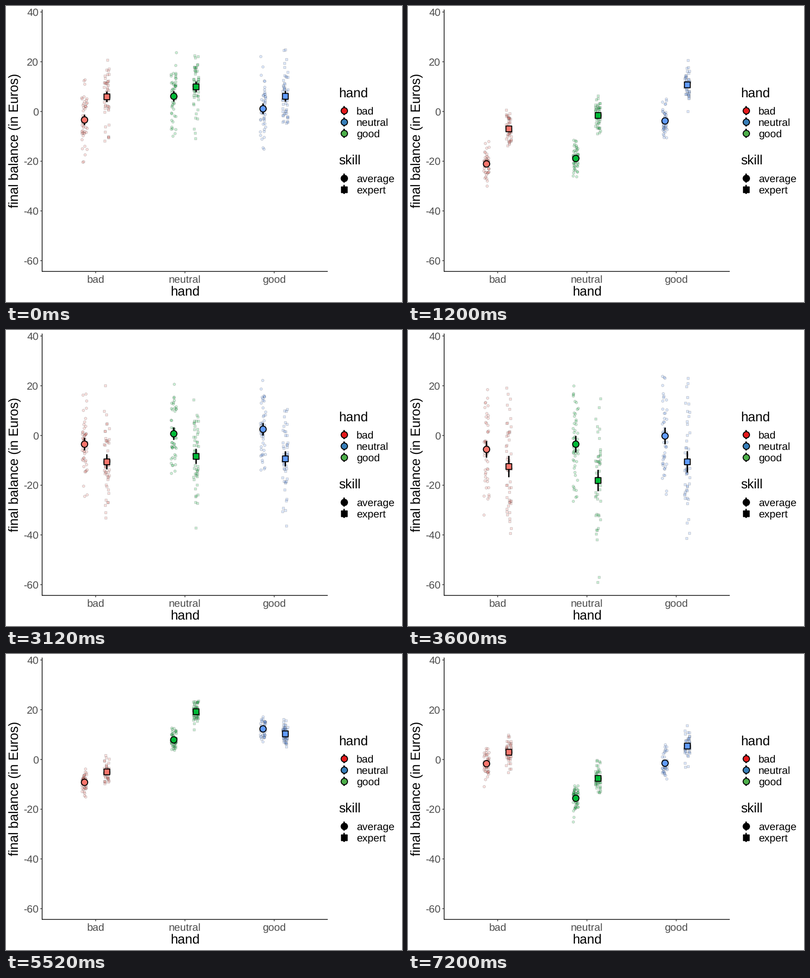
These frames come from a looping animation (800 px wide and 600 px high, 8000 ms). A matplotlib script:

```python
import numpy as np
import matplotlib.pyplot as plt
from matplotlib.animation import FuncAnimation

PT = 0.72  # points per pixel at 100 dpi
COUNT = 50
STEP = 400  # ms per frame
SCENE_FRAMES = 3
LEFT, RIGHT, TOP, BOTTOM = 73, 650, 7.3, 538
UNIT = (RIGHT - LEFT) / 3.2  # distance between categories
THIN, BAR = 1.42, 2.85

plt.rcParams.update({"font.family": "Liberation Sans", "path.snap": False,
                     "text.hinting": "none"})

HANDS = ["bad", "neutral", "good"]
HUES = ["#F8766D", "#00BA38", "#619CFF"]
KEY_HUES = ["#E41A1C", "#377EB8", "#4DAF4A"]
HAND_X = LEFT + UNIT * (0.6 + np.arange(3))

# Standard deviation for average and expert, then the mean of each group
SCENES = [
    ((7.7, 7.7), (-3.4, 5.9, 6.1, 9.9, 1.1, 6.1)),
    ((3.7, 3.7), (-21.1, -7.0, -18.9, -1.6, -3.8, 10.7)),
    ((9.0, 11.0), (-3.5, -10.6, 0.7, -8.4, 2.5, -9.4)),
    ((12.0, 15.5), (-5.6, -12.5, -3.5, -18.1, -0.2, -10.6)),
    ((2.4, 2.6), (-9.2, -5.0, 7.9, 19.2, 12.3, 10.3)),
    ((1.8, 1.9), (-5.0, -17.7, 4.5, -9.2, 4.9, -12.6)),
    ((3.2, 3.3), (-1.7, 2.9, -15.6, -7.6, -1.5, 5.4)),
]


def to_y(value):
    return 213.8 - 5.04 * value


def build_scene(rng, spreads, means):
    """Return raw points and means by skill, and the interval segments."""
    points, centres, bars = [], [], []
    for skill, spread in enumerate(spreads):
        xs = HAND_X + UNIT * (0.125 if skill else -0.125)
        mids = np.array(means[skill::2])
        noise = rng.normal(size=(3, COUNT))
        noise -= noise.mean(axis=1, keepdims=True)
        noise /= noise.std(axis=1, keepdims=True)
        ys = to_y(mids[:, None] + spread * noise)
        jitter = rng.uniform(-5.4, 5.4, (3, COUNT))
        points.append(np.column_stack([(xs[:, None] + jitter).ravel(),
                                       ys.ravel()]))
        centres.append(np.column_stack([xs, to_y(mids)]))
        half = 1.96 * spread / np.sqrt(COUNT)
        bars += [[(x, to_y(m - half)), (x, to_y(m + half))]
                 for x, m in zip(xs, mids)]
    return points, centres, bars


rng = np.random.default_rng(12)
scenes = [build_scene(rng, *scene) for scene in SCENES]

fig = plt.figure(figsize=(8, 6), dpi=100, facecolor="white")
ax = fig.add_axes([0, 0, 1, 1])
ax.set_xlim(0, 800)
ax.set_ylim(600, 0)
ax.axis("off")


def line(xs, ys, color="black", width=THIN):
    ax.plot(xs, ys, color=color, lw=width * PT, solid_capstyle="butt")


def label(x, y, text, size=21.33, color="black", ha="left", **kw):
    ax.text(x, y, text, fontsize=size * PT, color=color, ha=ha,
            va="baseline", **kw)


def title(x, y, text, **kw):
    label(x, y, text, 26.67, **kw)


def marks(xy, skill, colors, sizes, stroke, **kw):
    xy = np.asarray(xy)
    return ax.scatter(xy[:, 0], xy[:, 1], s=(sizes[skill] * PT) ** 2,
                      marker="os"[skill], facecolors=colors,
                      edgecolors="black", linewidths=stroke * PT,
                      snap=False, **kw)


def mean_marks(xy, skill, colors):
    return marks(xy, skill, colors, (12.9, 11.7), 1.9, zorder=5)


def raw_marks(xy, skill):
    return marks(xy, skill, np.repeat(HUES, COUNT), (5.2, 4.6), 0.94,
                 alpha=0.2, zorder=3)


# Axes
line([LEFT, LEFT], [TOP, BOTTOM + THIN / 2])
line([LEFT, RIGHT], [BOTTOM, BOTTOM])
for value in range(-60, 41, 20):
    y = to_y(value)
    line([LEFT - 3.7, LEFT], [y, y], "#333333")
    label(66, y + 7.6, str(value), color="#4D4D4D", ha="right")
for x, name in zip(HAND_X, HANDS):
    line([x, x], [BOTTOM, BOTTOM + 3.7], "#333333")
    label(x, 560.7, name, color="#4D4D4D", ha="center")
title((LEFT + RIGHT) / 2, 587.2, "hand", ha="center")
title(25.6, (TOP + BOTTOM) / 2, "final balance (in Euros)", ha="center",
      rotation=90, rotation_mode="anchor")


def legend(y, name, keys, skills, colors):
    title(672, y, name)
    for i, (key, skill, color) in enumerate(zip(keys, skills, colors)):
        mid = y + 27.6 + 23.04 * i
        line([683, 683], [mid - 9.2, mid + 9.2], width=BAR)
        mean_marks([(683, mid)], skill, color)
        label(708, mid + 7.8, key)


legend(184.4, "hand", HANDS, (0, 0, 0), KEY_HUES)
legend(321.2, "skill", ("average", "expert"), (0, 1), ("black", "black"))

points, centres, bars = scenes[0]
raw = [raw_marks(points[k], k) for k in (0, 1)]
ranges = ax.vlines(np.zeros(len(bars)), 0, 1, colors="black", lw=BAR * PT,
                   zorder=4)
dots = [mean_marks(centres[k], k, HUES) for k in (0, 1)]


def draw(frame):
    points, centres, bars = scenes[frame // SCENE_FRAMES]
    for k in (0, 1):
        raw[k].set_offsets(points[k])
        dots[k].set_offsets(centres[k])
    ranges.set_segments(bars)
    return [*raw, ranges, *dots]


anim = FuncAnimation(fig, draw, frames=8000 // STEP, interval=STEP,
                     repeat=True, repeat_delay=0, blit=False)
plt.show()
```
